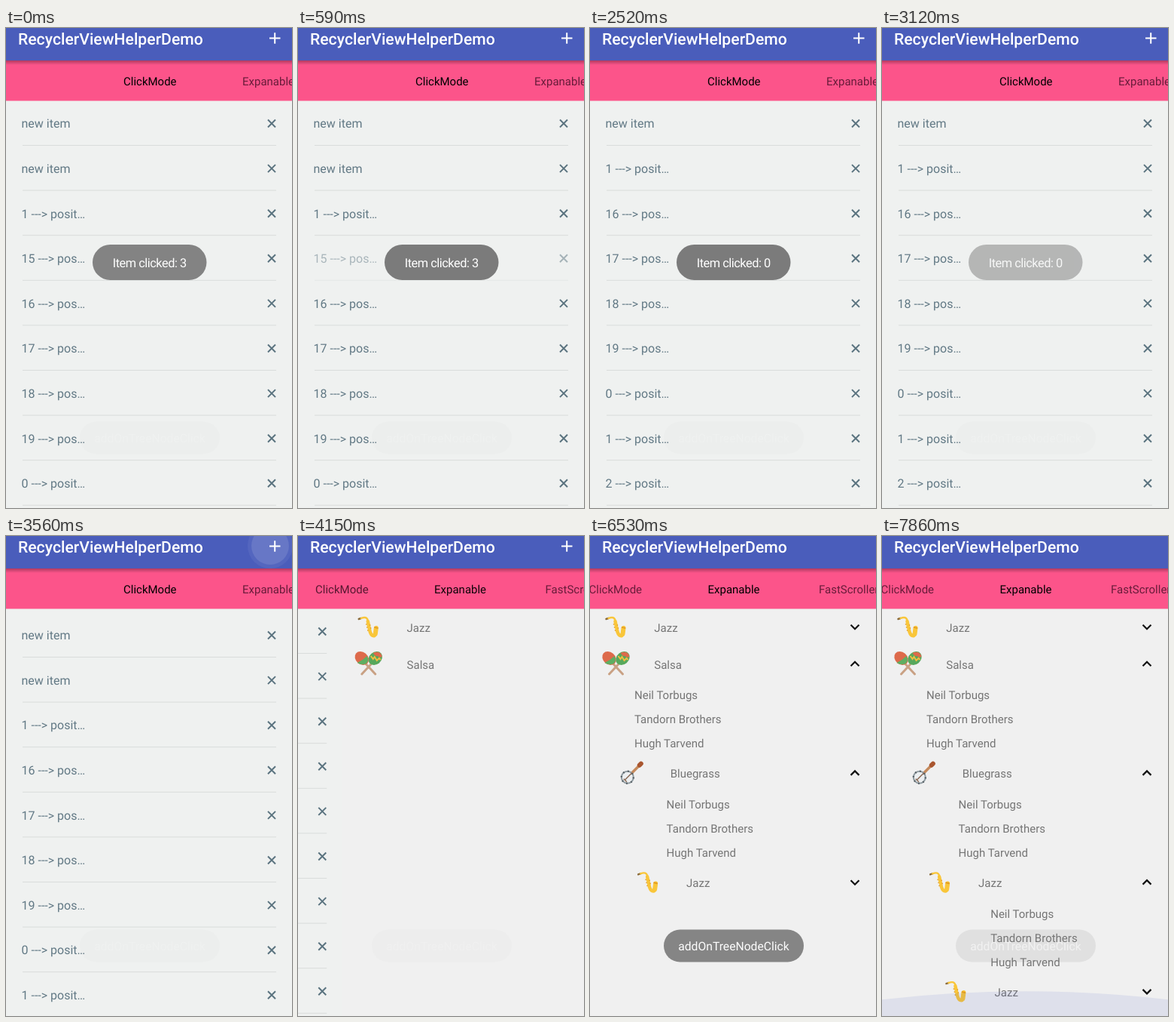
Animation, 380 px wide and 636 px high, one loop 8 s. Source, as an HTML page:

```html
<!DOCTYPE html>
<html lang="en">
<head>
<meta charset="utf-8">
<title>RecyclerViewHelperDemo</title>
<style>
  html, body { margin: 0; width: 100%; height: 100%; overflow: hidden; background: #f0f0f0; }
  svg { display: block; font-family: Roboto, sans-serif; }
  text { text-rendering: geometricPrecision; white-space: pre; }
  .title { font-size: 21.2px; font-weight: 500; fill: #fff; }
  .tab, .tree text { font-size: 15px; }
  .tree text { fill: #757575; }
  .list text { font-size: 16px; fill: #627985; }
  .cross { fill: none; stroke: #5a737f; stroke-width: 2; }
  .rule { stroke: #d9dcdb; }
  .chevron { fill: none; stroke: #111; stroke-width: 2.2; }
  .toast text { fill: #fff; text-anchor: middle; }
</style>
</head>
<body>
<svg width="380" height="636" viewBox="0 0 380 636">
  <defs>
    <linearGradient id="shade" x2="0" y2="1">
      <stop stop-color="#000" stop-opacity=".3"/>
      <stop offset="1" stop-color="#000" stop-opacity="0"/>
    </linearGradient>
    <clipPath id="bar"><path d="M0 0H380V43H0z"/></clipPath>
    <g id="sax" fill="none" stroke="#f9c63a" stroke-linecap="round" stroke-linejoin="round">
      <path stroke="#8a6a3a" stroke-width="2.4" d="M-13-11l3-1"/>
      <path stroke-width="2.4" d="M-10-12Q-2-15-1-9"/>
      <path stroke-width="4.5" d="M-1-8L2 6Q4 12 8 11L10 4"/>
      <path stroke-width="6" d="M9 9L10 1"/>
      <path stroke="#e29a22" stroke-width="1.6" d="M-3-4v.1M-2 0v.1M-1 4v.1M2-3v.1M3 1v.1M8 0l4 1"/>
    </g>
    <g id="maracas">
      <path fill="none" stroke="#c9a184" stroke-width="3" stroke-linecap="round" d="M-5-2L9 13M5-2L-9 13"/>
      <ellipse rx="10" ry="8" fill="#dd6a4b" transform="translate(-9 -8) rotate(40)"/>
      <path fill="#5fae62" d="M-15-2Q-8-5-2-11Q1-4-3-1Q-9 2-15-2"/>
      <ellipse rx="10" ry="8" fill="#57a85c" transform="translate(9 -8) rotate(-40)"/>
      <path fill="#dd6a4b" d="M6-15Q16-19 18-10Q14-8 12-11Q9-10 6-15"/>
      <path fill="none" stroke="#f0bd42" stroke-width="2" d="M3-11l3 4 2-3 3 5 3-3 2 2"/>
    </g>
    <g id="banjo">
      <path stroke="#c58a5c" stroke-width="3.5" d="M-3 2L9-10"/>
      <path stroke="#a9562f" stroke-width="6" stroke-linecap="round" d="M10-11l2-2"/>
      <circle cx="-6" cy="5" r="8" fill="#eceff1" stroke="#8f9aa0" stroke-width="2"/>
      <circle cx="-6" cy="5" r="8" fill="none" stroke="#4d565b" stroke-width="2.4" stroke-dasharray="1.5 4.8"/>
      <path stroke="#8a6a55" stroke-width="1.5" d="M-9 8L0-1M-11 7l4 4"/>
    </g>
  </defs>
  <g id="scene"></g>
</svg>
<script>
const DURATION = 8000, STEPS = 54, STEP = DURATION / STEPS;
const ROW = 59.6, SECTION = 144.7;
const scene = document.getElementById('scene');

// Piecewise linear value from time, value, time, value...
function key(t, ...k) {
  if (t <= k[0]) return k[1];
  for (let i = 2; i < k.length; i += 2) {
    if (t <= k[i]) return k[i - 1] + (k[i + 1] - k[i - 1]) * (t - k[i - 2]) / (k[i] - k[i - 2]);
  }
  return k[k.length - 1];
}
const smooth = p => p * p * (3 - 2 * p);
const text = (x, y, s, attrs = '') => `<text x="${x}" y="${y}" ${attrs}>${s}</text>`;
const group = (attrs, body) => `<g ${attrs}>${body}</g>`;

const position = n => `${n} ---&gt; ${n > 9 ? 'pos' : 'posit'}…`;
const items = [
  { label: 'new item', born: 3407 },
  { label: 'new item', dies: 2222 },
  { label: 'new item' },
  ...[1, 15, 16, 17, 18, 19, 0, 1, 2, 3].map(n => ({ label: position(n), dies: n === 15 ? 592 : 0 }))
];

function list(t) {
  let y = 126.5 + key(t, 3407, 0, 3556, 5, 3704, 0), out = '';
  for (const { label, born, dies } of items) {
    let alpha = 1, size = 1;
    if (born) alpha = size = key(t, born, 0, born + 148, 1);
    if (dies) {
      alpha = key(t, dies - 50, 1, dies + 50, 0);
      size = 1 - smooth(key(t, dies + 40, 0, dies + 280, 1));
    }
    if (alpha) out += group(`transform="translate(0 ${y})" opacity="${alpha}"`,
      text(20.5, 5.8, label) +
      '<path class="cross" d="M348-5l10 10m0-10l-10 10"/><path class="rule" d="M22 29H359"/>');
    y += ROW * size;
  }
  return group('class="list"', out);
}

const players = ['Neil Torbugs', 'Tandorn Brothers', 'Hugh Tarvend'];
const nodes = [['Salsa', 'maracas', 4889], ['Bluegrass', 'banjo', 6074], ['Jazz', 'sax', 7111], ['Jazz', 'sax', Infinity]];

function node(t, label, icon, depth, y, opens) {
  const angle = isFinite(opens) ? key(t, opens, 0, opens + 200, -180) : 0;
  return `<use href="#${icon}" x="${34.5 + 21.3 * depth}" y="${y}"/>` +
    text(85.3 + 21.4 * depth, y + 5.5, label) +
    `<path class="chevron" d="M-5.5-2.7L0 2.8L5.5-2.7" transform="translate(352 ${y - .5}) rotate(${angle})"/>`;
}

function tree(t) {
  let out = node(t, 'Jazz', 'sax', 0, 121, Infinity), alpha = 1;
  nodes.forEach(([label, icon, opens], k) => {
    const y = 170 + SECTION * k;
    out += group(`opacity="${alpha}"`, node(t, label, icon, k, y, opens));
    alpha = isFinite(opens) ? key(t, opens - 40, 0, opens + 120, 1) : 0;
    if (alpha) out += group(`opacity="${alpha}"`,
      players.map((name, j) => text(59 + 42.6 * k, y + 46.3 + 32 * j, name)).join(''));
  });
  return group('class="tree"', out);
}

function toast(alpha, x, y, w, h, label, attrs) {
  return alpha ? group(`class="toast" opacity="${alpha}"`,
    `<rect x="${x}" y="${y}" width="${w}" height="${h}" rx="${h / 2}" fill="#7b7b7b"/>` +
    text(x + w / 2, y + h / 2 + 6, label, attrs)) : '';
}

function toasts(t) {
  const click = key(t, 0, .93, 296, 1, 889, 1, 1185, 0, 2222, 0, 2518, 1, 2963, 1, 3259, 0);
  const tree = key(t, 4889, .02, 5040, .4, 5333, .93, 5640, .93, 5790, .86, 6080, .3,
    6230, .4, 6530, .93, 7560, .93, 7855, .12);
  return toast(click, 115, 287, 151.5, 47, `Item clicked: ${t < 2000 ? 3 : 0}`,
      'font-size="16.4" letter-spacing="-.5"') +
    toast(tree, 98, 521.5, 186, 43, 'addOnTreeNodeClick', 'font-size="15.7"');
}

function header(t, page) {
  const shift = 157.5 * page;
  const tab = (x, label, chosen) => text(x - shift, 75.6, label,
    `class="tab" fill="rgb(${105 * (1 - chosen)},${28 * (1 - chosen)},${58 * (1 - chosen)})"`);
  const ripple = key(t, 3300, 0, 3407, .4, 3556, 1, 3704, 1, 4000, 0);
  const radius = key(t, 3407, 12, 3556, 25);
  return '<path fill="#fc548a" d="M0 42H380V96.5H0z"/>' +
    tab(156, 'ClickMode', 1 - page) + tab(314, 'Expanable', page) + tab(461.5, 'FastScroller', 0) +
    '<path fill="url(#shade)" d="M0 43H380V49H0z"/><path fill="#4a5dbb" d="M0 0H380V43H0z"/>' +
    group(`clip-path="url(#bar)" fill="#fff" opacity="${ripple}"`,
      `<circle cx="351" cy="13" r="${radius + 5}" opacity=".06"/><circle cx="351" cy="13" r="${radius}" opacity=".11"/>`) +
    text(16, 21.8, 'RecyclerViewHelperDemo', 'class="title"') +
    (t < 4590 ? '<path stroke="#fff" stroke-width="2" d="M350 13.5h14.5M357.2 6.3v14.5"/>' : '');
}

function glow(t) {
  const rise = 22 * key(t, 7410, 0, 7855, 1);
  return `<path fill="#3f51b5" opacity=".1" d="M0 ${636 - rise}Q190 ${636 - 2 * rise} 380 ${636 - rise}V636H0z"/>`;
}

function render(t) {
  const page = smooth(key(t, 3704, 0, 4296, 1));
  const slide = x => `transform="translate(${x - 380 * page} 0)"`;
  scene.innerHTML =
    (page < 1 ? group(slide(0), '<path fill="#eff1f0" d="M0 96H380V636H0z"/>' + list(t)) : '') +
    (page > 0 ? group(slide(380), '<path fill="#f0f0f0" d="M0 96H380V636H0z"/>' + tree(t)) : '') +
    glow(t) + header(t, page) + toasts(t);
}

let shown = -1;
function frame() {
  const step = Math.min(STEPS - 1, Math.floor((performance.now() % DURATION + 5) / STEP));
  if (step !== shown) render((shown = step) * STEP);
  requestAnimationFrame(frame);
}
frame();
</script>
</body>
</html>
```
